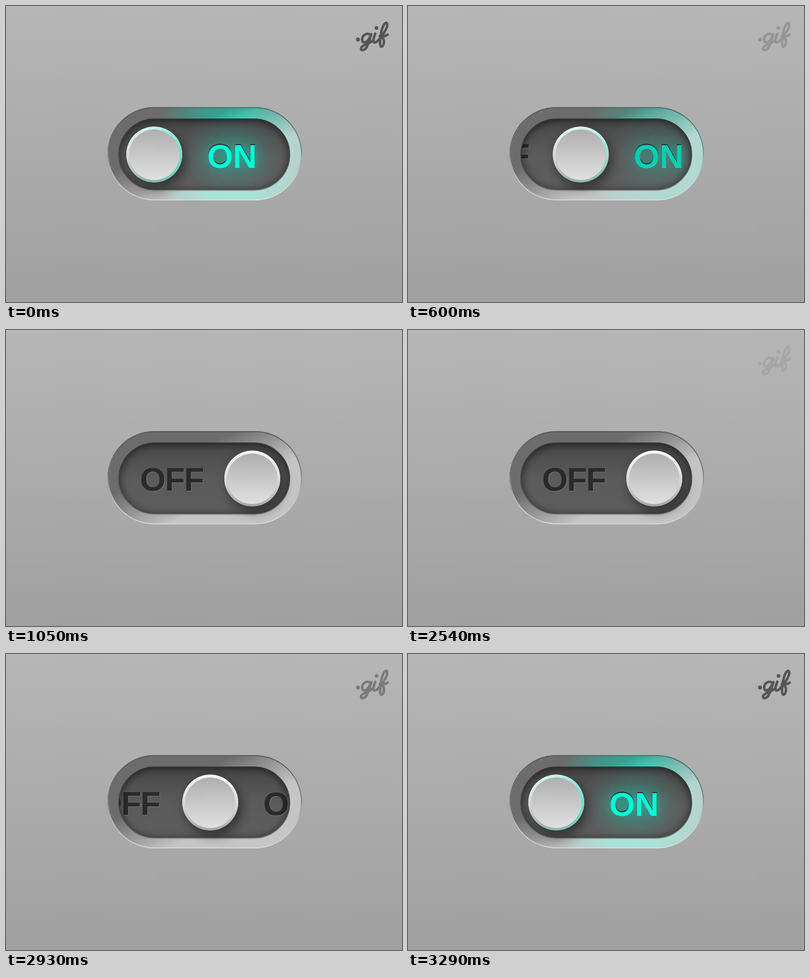
An HTML page with a canvas that plays this animation: 800 by 600 pixels, repeating every 4.29 s.

```html
<!DOCTYPE html>
<html lang="en">
<head>
<meta charset="utf-8">
<title>Toggle switch</title>
<style>
html, body { margin: 0; width: 100%; height: 100%; overflow: hidden; background: #ababab; }
canvas { display: block; width: 800px; height: 600px; }
</style>
</head>
<body>
<canvas id="stage" width="800" height="600"></canvas>
<script>
const ctx = document.getElementById('stage').getContext('2d');
const LOOP = 4290;
const FONT = 'bold 67px "Liberation Sans", Arial, sans-serif';
const KNOB = { on: 299.5, travel: 198, y: 301, r: 56.5 };

const clamp = v => Math.max(0, Math.min(1, v));
const ramp = (t, from, to) => clamp((t - from) / (to - from));
const snap = (t, origin, step) => origin + Math.floor((t - origin) / step) * step;

function linear(x0, y0, x1, y1, stops) {
  const g = ctx.createLinearGradient(x0, y0, x1, y1);
  stops.forEach(([at, color]) => g.addColorStop(at, color));
  return g;
}

function radial(x, y, r, stops) {
  const g = ctx.createRadialGradient(x, y, 0, x, y, r);
  stops.forEach(([at, color]) => g.addColorStop(at, color));
  return g;
}

function pill(x, y, w, h) {
  const p = new Path2D();
  p.roundRect(x, y, w, h, h / 2);
  return p;
}

function layer(draw) {
  ctx.save();
  draw();
  ctx.restore();
}

function shadow(color, blur, dx = 0, dy = 0) {
  ctx.shadowColor = color;
  ctx.shadowBlur = blur;
  ctx.shadowOffsetX = dx;
  ctx.shadowOffsetY = dy;
}

const rim = pill(205, 205, 393, 189);
const rimEdge = pill(206, 206, 391, 187);
const panel = pill(228, 229, 345, 144);
const panelEdge = pill(228, 229, 345, 144.5);
const panelFrame = new Path2D('M100 100H700V500H100Z');
panelFrame.addPath(panel);

const script = new Path2D(
  'M736 59C731 53 719.5 58 719.5 68C719.5 77 729 76 735 63' +
  'M738 57C735 68 731 82 726 87C720 92 715 89 718 84C722 78 735 77 742 69' +
  'M746 56C743 64 740 74 745 74C749 74 753 69 757 63' +
  'M755 66C763 57 773 41 769.5 35C766 31 760 42 758 54C756 66 754 82 758 82.5C763 82 766 70 761 65' +
  'M755 61C761 62.5 767 61 771 58');

function state(time) {
  let t = time;
  if (t < 30) t = 0;
  else if (t < 1500) t = snap(t, 30, 30);
  else t = snap(t, 2540, 30);

  // The lettering fades in coarser steps until the knob starts to move.
  let fadeTime = t;
  if (t >= 30 && t < 480) fadeTime = snap(t, 30, 120);
  if (t >= 2540 && t < 2660) fadeTime = 2540;

  const back = t > 1500;
  return {
    pos: back ? 1 - ramp(t, 2660, 3290) : ramp(t, 450, 1050),
    lit: back ? ramp(t, 3050, 3290) : 1 - ramp(t, 540, 810),
    label: back
      ? (t < 2540 ? 0 : ramp(fadeTime, 2425, 3275))
      : (t === 0 ? 1 : 1 - ramp(fadeTime, -80, 920))
  };
}

function drawBackground() {
  ctx.fillStyle = linear(0, 0, 0, 600, [[0, '#b6b6b6'], [1, '#a0a0a0']]);
  ctx.fillRect(0, 0, 800, 600);
}

function drawLabel(alpha) {
  if (alpha <= 0) return;
  layer(() => {
    ctx.globalAlpha = alpha;
    ctx.strokeStyle = ctx.fillStyle = '#555';
    ctx.lineWidth = 5;
    ctx.lineCap = ctx.lineJoin = 'round';
    ctx.stroke(script);
    [[711, 68, 4], [748.5, 44.5, 3.7]].forEach(([x, y, r]) => {
      ctx.beginPath();
      ctx.arc(x, y, r, 0, Math.PI * 2);
      ctx.fill();
    });
  });
}

function drawRim(lightX, glow) {
  ctx.fillStyle = linear(187, 350, 237, 444, [[0, '#6c6c6c'], [0.5, '#979797'], [1, '#c5c5c5']]);
  ctx.fill(rim);
  ctx.lineWidth = 2;
  ctx.strokeStyle = linear(0, 205, 0, 394,
    [[0, '#565656'], [0.45, '#777'], [0.72, '#c2c2c2'], [1, '#d8d8d8']]);
  ctx.stroke(rimEdge);
  if (glow <= 0) return;
  layer(() => {
    ctx.clip(rim);
    ctx.globalAlpha = glow;
    ctx.globalCompositeOperation = 'overlay';
    ctx.fillStyle = radial(lightX, 303, 165,
      [[0, 'rgba(0,255,215,.6)'], [0.5, 'rgba(0,255,215,.54)'],
       [0.76, 'rgba(0,255,215,.26)'], [1, 'rgba(0,255,215,0)']]);
    ctx.fillRect(200, 200, 400, 200);
  });
}

function drawWord(word, x, baseline, spacing) {
  ctx.letterSpacing = spacing + 'px';
  ctx.fillStyle = '#7c7c7c';
  ctx.fillText(word, x + 1, baseline + 1);
  ctx.fillStyle = '#2a2a2a';
  ctx.fillText(word, x, baseline);
}

function drawLitWord(x, lit, glow) {
  ctx.letterSpacing = '0px';
  ctx.fillStyle = '#00ffd8';
  [[48, 0.55], [22, 0.4]].forEach(([blur, strength]) => layer(() => {
    ctx.globalAlpha = glow * strength;
    shadow('#00e6c3', blur, 1000);
    ctx.fillText('ON', x - 1000, 327);
  }));
  ctx.fillStyle = '#2a2a2a';
  ctx.fillText('ON', x, 326);
  layer(() => {
    ctx.globalAlpha = lit;
    ctx.fillText('ON', x, 326);
    ctx.fillStyle = '#00ffd8';
    ctx.fillText('ON', x, 327.5);
  });
}

function drawPanel(knobX, pos, lit, glow) {
  const lightX = knobX + 157;
  layer(() => {
    ctx.clip(panel);
    ctx.fillStyle = linear(0, 229, 0, 373, [[0, '#474747'], [0.5, '#5b5b5b'], [1, '#5e5e5e']]);
    ctx.fillRect(228, 229, 345, 144);
    if (glow > 0) {
      layer(() => {
        ctx.globalAlpha = glow;
        ctx.fillStyle = radial(lightX, 303, 105,
          [[0, 'rgba(30,190,165,.22)'], [0.5, 'rgba(50,170,150,.14)'], [1, 'rgba(90,130,122,0)']]);
        ctx.fillRect(228, 229, 345, 144);
      });
    }
    ctx.font = FONT;
    drawWord('OFF', knobX - 234.7 + 8 * pos, 326, -2);
    drawWord('ON', knobX + 107, 327, 0);
    if (lit > 0) drawLitWord(knobX + 107, lit, glow);
    shadow('rgba(0,0,0,.65)', 18, 0, 2);
    ctx.fillStyle = '#444';
    ctx.fill(panelFrame, 'evenodd');
  });
  ctx.lineWidth = 2;
  ctx.strokeStyle = linear(0, 229, 0, 373, [[0, '#353535'], [0.6, '#474747'], [1, '#808080']]);
  ctx.stroke(panelEdge);
}

function disc(x, y, r, fill) {
  ctx.beginPath();
  ctx.arc(x, y, r, 0, Math.PI * 2);
  ctx.fillStyle = fill;
  ctx.fill();
}

function drawKnob(x, glow) {
  const { y, r } = KNOB;
  layer(() => {
    shadow('rgba(0,0,0,.5)', 25, 6, 10);
    disc(x, y, r, '#999');
  });
  disc(x, y, r, linear(0, y - r, 0, y + r, [[0, '#f8f8f8'], [0.5, '#dcdcdc'], [1, '#a6a6a6']]));
  if (glow > 0) {
    layer(() => {
      ctx.globalAlpha = glow;
      disc(x, y, r, linear(x - r, y, x + r, y,
        [[0, 'rgba(40,225,195,.03)'], [0.5, 'rgba(40,225,195,.24)'], [1, 'rgba(40,225,195,.6)']]));
    });
  }
  disc(x, y + 0.5, 51.2, linear(0, y - 51, 0, y + 52, [[0, '#afafaf'], [1, '#e0e0e0']]));
}

function render(time) {
  const { pos, lit, label } = state(time);
  const knobX = KNOB.on + KNOB.travel * pos;
  const glow = lit * lit;
  drawBackground();
  drawLabel(label);
  drawRim(knobX + 157, glow);
  drawPanel(knobX, pos, lit, glow);
  drawKnob(knobX, glow);
}

const start = performance.now();
function tick() {
  render((performance.now() - start) % LOOP);
  requestAnimationFrame(tick);
}
tick();
</script>
</body>
</html>
```
